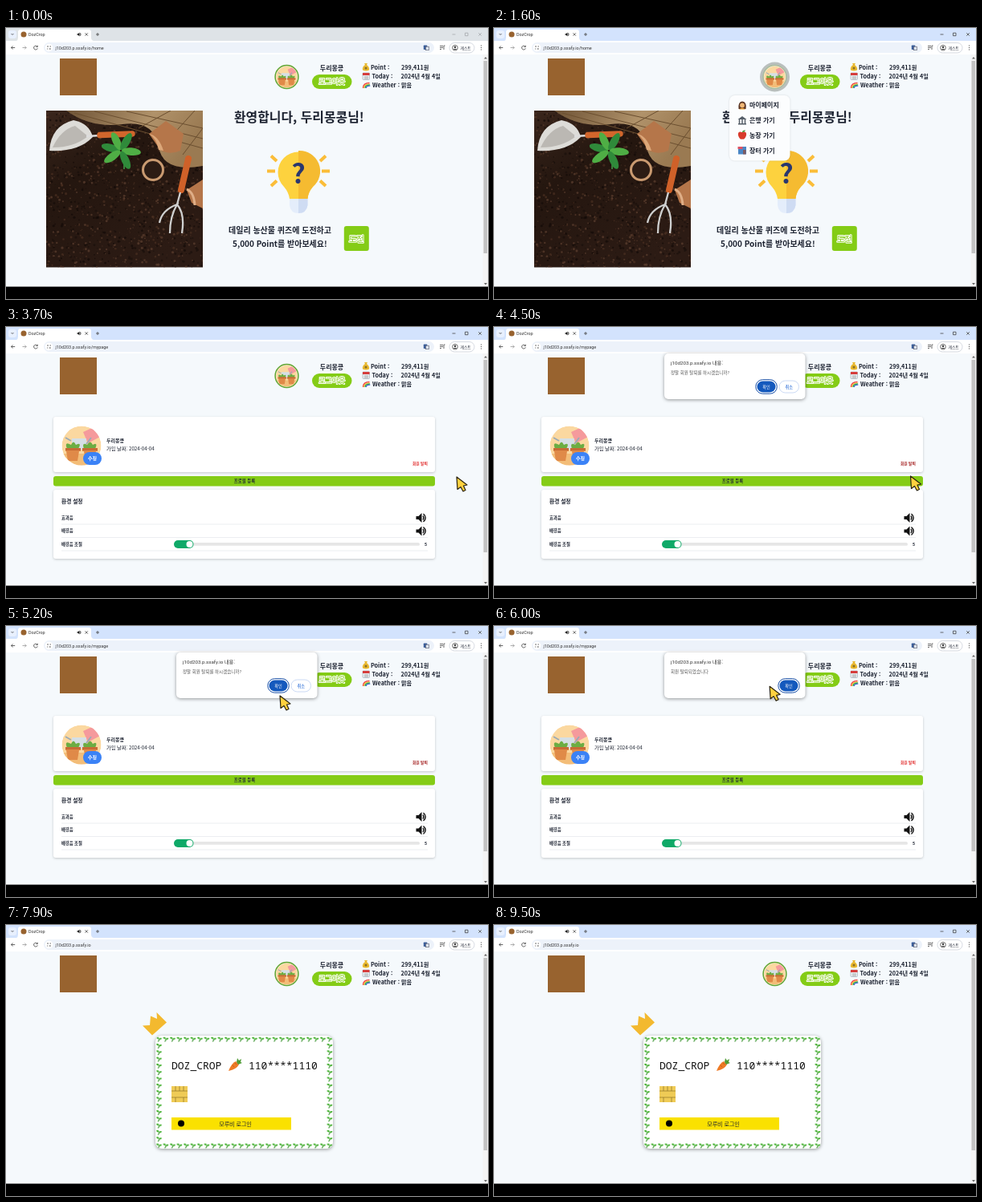
Write an HTML page that moves like this. It is 600 px wide and 338 px high and loops after 9600 ms.

```html
<!DOCTYPE html>
<html lang="ko">
<head>
<meta charset="utf-8">
<style>
html, body { margin: 0; width: 100%; height: 100%; overflow: hidden; background: #000; }
svg { display: block; width: 100vw; height: 100vh; }
text { font-family: "Noto Sans CJK KR", "Noto Sans CJK", "Noto Sans KR", sans-serif; fill: #1c2230; white-space: pre; }
.url { font-family: Roboto, sans-serif; fill: #333; }
.b { font-weight: 700; }
.mid { text-anchor: middle; }
.info { font-size: 7.2px; font-weight: 700; }
.row { font-size: 5.3px; font-weight: 700; }
.item { font-size: 8px; font-weight: 700; }
.line { fill: none; stroke: #444; stroke-width: .8; }
.puff { fill: #84cc16; stroke: #fff; stroke-width: 2; stroke-linejoin: round; paint-order: stroke; text-anchor: middle; }
.lime { fill: #84cc16; }
.card { fill: #fff; filter: drop-shadow(0 1px 1.5px #0003); }
.dialog { fill: #fff; filter: drop-shadow(0 1px 2px #0006); }
.ask { font-size: 5.5px; fill: #555; }
</style>
</head>
<body>
<svg viewBox="0 0 600 338" preserveAspectRatio="none">
<defs>
  <clipPath id="disc"><circle r="24.5"/></clipPath>
  <clipPath id="frame"><rect x="50" y="103" width="195" height="195.5"/></clipPath>
  <g id="avatar" clip-path="url(#disc)">
    <circle r="24.5" fill="#fbd8a0"/>
    <path d="M-25 10H25V25H-25Z" fill="#f3bd78"/>
    <path d="M2 -17l13 -6 8 12 -15 8z" fill="#f59a9c"/>
    <path d="M-12 -9h18v14h-18z" fill="#d5dfe5"/>
    <path d="M-13 -6l-7 -4M6 -2l6 -8" stroke="#9cabb5" stroke-width="2"/>
    <path d="M-18 4q-4 -10 5 -5q3 -7 6 0q8 -4 3 5zM3 4q-3 -9 4 -5q4 -7 7 0q7 -4 3 5z" fill="#6cad43"/>
    <path d="M-20 3H-1V7H-3L-5 19H-17L-19 7H-20ZM1 3H20V7H18L16 19H5L3 7H1Z" fill="#e08a48"/>
    <path d="M-20 3H-1V6H-20ZM1 3H20V6H1Z" fill="#c76b35"/>
  </g>
  <g id="speaker">
    <path d="M-6 -2h3l4 -4v12l-4 -4h-3z" fill="#111"/>
    <path d="M2.5 -2.5q2 2.5 0 5M3 -5q5.500 5 0 10" fill="none" stroke="#111" stroke-width="1.400"/>
  </g>
  <pattern id="sprouts" x="186" y="138" width="8.5" height="8.3" patternUnits="userSpaceOnUse">
    <path d="M1 2q3.500 -1.500 3.500 2q-3 1 -3.500 -2zM8 3q-3.500 -1 -3.500 2q3 .8 3.500 -2z" fill="#3fae2a"/>
    <path d="M4.500 4q.5 2 -1.500 3.500" fill="none" stroke="#2f8f24"/>
  </pattern>
  <linearGradient id="soil" x2=".6" y2="1"><stop stop-color="#3a261c"/><stop offset=".4" stop-color="#24160f"/><stop offset="1" stop-color="#2c1b14"/></linearGradient>
  <linearGradient id="burlap" x2="1" y2=".3"><stop stop-color="#6d5235"/><stop offset=".6" stop-color="#b0926a"/><stop offset="1" stop-color="#9a7a52"/></linearGradient>
</defs>

<!-- browser -->
<rect width="600" height="323" fill="#f5f9fc"/>
<rect id="strip" width="600" height="18"/>
<path d="M13 16Q15 15 15 12V5Q15 2 18 2H103Q106 2 106 5V12Q106 15 109 16H600V33H0V16Z" fill="#fff"/>
<rect x="3" y="3" width="10" height="10" rx="3" fill="#e8f0fe"/>
<path class="line" d="M6.500 7l1.500 1.500 1.500 -1.500M98.500 6.300l3.400 3.400m0 -3.400l-3.400 3.400M112 8h4m-2 -2v4"/>
<path id="controls" class="line" d="M555.500 8h4M571.500 6.200h3.500v3.500h-3.500zM588.300 6.200l3.500 3.500m0 -3.500l-3.500 3.500"/>
<circle cx="22" cy="8" r="3.500" fill="#98632f"/>
<text class="url" x="28" y="10.200" font-size="5.400">DozCrop</text>
<use href="#speaker" transform="translate(91 8) scale(.4)"/>
<path class="line" d="M11.200 24.500H6.500m2 -2l-2 2 2 2M39 23.300a2.400 2.400 0 1 0 .3 2M39.300 21.800v1.800h-1.800"/>
<path class="line" d="M20.500 24.500h4.700m-2 -2l2 2 -2 2" style="stroke:#999"/>
<rect x="47" y="18" width="486" height="13" rx="6.500" fill="#edf2fa"/>
<circle cx="53.500" cy="24.500" r="4.800" fill="#fff"/>
<path class="line" d="M51 23h2m1.500 0h1.500M51 26h1m1.500 0h2.500"/>
<text id="address" class="url" x="61.500" y="26.600" font-size="5.450"></text>
<rect x="519.800" y="21.500" width="4.500" height="5.500" rx=".8" fill="#3c5f9b"/><rect x="522.500" y="23.200" width="3.800" height="4.500" fill="#dce4f0" stroke="#556" stroke-width=".6"/>
<path class="line" d="M540 22.500h4M540 24.500h4M540 26.500h2M545 27v-5h1.500"/>
<rect x="552" y="18.500" width="31" height="12.500" rx="6.200" fill="#fff" stroke="#c5cbd5" stroke-width=".7"/>
<circle class="line" cx="559" cy="24.700" r="3.300"/><circle cx="559" cy="23.800" r="1.100"/><path d="M557 26.800q2 -2 4 0z"/>
<text x="565.500" y="26.600" font-size="4.800">게스트</text>
<path d="M591 21.500h1v1h-1zM591 24h1v1h-1zM591 26.500h1v1h-1z" fill="#444"/>
<rect x="593.500" y="33" width="6.500" height="290" fill="#f4f4f4"/>
<rect x="594.500" y="41" width="4.500" height="240" fill="#c2c2c2"/>
<path d="M595 38.500h4l-2 -2.500zM595 318h4l-2 2.500z" fill="#666"/>
<rect y="322.600" width="600" height="16"/>

<!-- page header -->
<rect x="67" y="38" width="46" height="46" fill="#98632f"/>
<g transform="translate(349.500 61)">
  <circle id="halo" r="18.500" fill="#b9bfbd"/>
  <circle r="14.500" fill="#fdf0d8"/>
  <use href="#avatar" transform="scale(.54)"/>
  <circle id="ring" r="14.400" fill="none" stroke-width="1.500"/>
</g>
<text class="b mid" x="405.500" y="53.300" font-size="8">두리몽콩</text>
<rect class="lime" x="381" y="58" width="49.500" height="18" rx="9"/>
<text class="puff" x="405.700" y="70.300" font-size="9">로그아웃</text>
<path d="M446 44h4l-1 2q4 3 3 6.500q-4 2 -8 0q-1 -4 3 -6.500z" fill="#e9b92f"/><circle cx="448" cy="50" r="1.600" fill="#8c7122"/>
<rect x="444" y="56" width="8.500" height="8.500" rx="1" fill="#e9edf1" stroke="#8795a3" stroke-width=".5"/><path d="M444 56h8.500v3h-8.500z" fill="#d63c3c"/><path d="M446 61h5M446 63h5" stroke="#777" stroke-width=".6"/>
<g fill="none" stroke-width="1.300"><path d="M444.500 75q0 -6.500 8 -6.500" stroke="#e44"/><path d="M445.700 75q0 -5 7 -5.200" stroke="#fb3"/><path d="M447 75q0 -4 6 -4" stroke="#3a5"/><path d="M448.300 75q0 -3 5 -2.800" stroke="#46c"/></g>
<g class="info">
  <text x="454" y="51.800">Point :</text><text x="492" y="51.800">299,411원</text>
  <text x="455.500" y="62.800">Today :</text><text x="491.500" y="62.800">2024년 4월 4일</text>
  <text x="456" y="73.800">Weather :</text><text x="492" y="73.800">맑음</text>
</g>

<g id="home">
  <g clip-path="url(#frame)">
    <rect x="50" y="103" width="195" height="196" fill="url(#soil)"/>
    <g id="crumbs"></g>
    <path d="M75 103Q105 125 145 120T190 148T245 172V103Z" fill="url(#burlap)"/>
    <path d="M85 106L245 150M110 104L245 138M150 104L245 125M165 125L205 103M195 147L235 103M220 158L245 125" stroke="#6b4f30" fill="none"/>
    <path d="M178 132l21 -16 22 16 -4 21q-14 6 -25 -1z" fill="#b5764a"/><path d="M178 132q12 2 18 21l-6 -1q-3 -15 -12 -20z" fill="#dca779"/>
    <path d="M225 202l20 -13v36l-14 -7z" fill="#b5764a"/><path d="M225 201q9 4 10 20" stroke="#dfae87" stroke-width="3" fill="none"/>
    <path d="M54 153Q56 122 84 115Q104 119 108 136Q90 155 54 153Z" fill="#dddcd8"/><path d="M58 149Q68 127 86 122L102 135Q85 149 58 149Z" fill="#bbb8b3"/>
    <path d="M100 135L118 134" stroke="#ddd" stroke-width="2.500"/><path d="M117 133.500L157 132" stroke="#d2662c" stroke-width="7.500" stroke-linecap="round"/>
    <path d="M143 154Q148 163 147 176" stroke="#3a7f3a" stroke-width="2" fill="none"/>
    <g id="leaves"></g>
    <circle cx="183" cy="177" r="12.500" fill="#2c1c14" stroke="#c99a70" stroke-width="3"/>
    <path d="M227 163L218 202" stroke="#cf6129" stroke-width="8" stroke-linecap="round"/>
    <path d="M217 205L213 220M191 243Q194 227 213 220Q204 235 204 256M213 220Q223 232 219 256" stroke="#cfd0d0" stroke-width="2.300" fill="none"/>
  </g>
  <text class="b" x="284" y="117.200" font-size="15.900">환영합니다, 두리몽콩님!</text>
  <path d="M325 178.500h10M393 178.500h10M330 159.500l7 6.500M398 159.500l-7 6.500M330 197l7 -6.500M398 197l-7 -6.500" stroke="#fbbd38" stroke-width="4"/>
  <path d="M353 213Q352 205 346 198A25.500 25.500 0 1 1 382 198Q376 205 375.500 213Z" fill="#fdd23e"/>
  <path d="M364 153A25.500 25.500 0 0 1 382 198Q376 205 375.500 213H364Z" fill="#f5bb31"/>
  <path d="M353 213H375.500V221Q374 231 364 231Q354 231 353 221Z" fill="#e4edfb"/><path d="M364 213H375.500V221Q374 231 364 231Z" fill="#cfdcf3"/>
  <text class="mid" x="364" y="194" font-size="34" font-weight="900" style="fill:#29376f">?</text>
  <text class="b" x="277" y="256.200" font-size="10">데일리 농산물 퀴즈에 도전하고</text>
  <text class="b" x="282" y="273.400" font-size="10">5,000 Point를 받아보세요!</text>
  <rect class="lime" x="420.800" y="247" width="31" height="31" rx="3"/>
  <text class="puff" x="436.300" y="266.500" font-size="10.500">도전</text>
</g>

<g id="menu">
  <rect x="293" y="84" width="75.500" height="81.500" rx="7" fill="#fcfdfe" style="filter:drop-shadow(0 .5px 1px #0002)"/>
  <path d="M304.500 101q-1 -9 4.500 -9.500q6 .5 4.500 9.500z" fill="#5b3525"/><circle cx="309" cy="96.500" r="2.900" fill="#f1b877"/><path d="M305 101.500q4 -3.500 8 0z" fill="#e69a2c"/>
  <path d="M303.500 114l5.500 -4 5.500 4zM304 119h10v1.500h-10z" fill="#555e68"/><path d="M305.500 114v5M309 114v5M312.500 114v5" stroke="#555e68" stroke-width="1.500"/>
  <path d="M309 130q6 -2 5 4q-2 6 -5 4.500q-3 1.500 -5 -4.500q-1 -6 5 -4z" fill="#d83b2c"/><path d="M309 130q0 -3 4 -2.500q-1 3 -4 2.500" fill="#4c9b3e"/>
  <path d="M304 148h10v9.500h-10z" fill="#4a86c5"/><path d="M303.500 148h6v3h-6z" fill="#dd5365"/><path d="M310 152h3.500v5.500h-3.500z" fill="#7d5a62"/>
  <g class="item"><text x="318" y="99.300">마이페이지</text><text x="318" y="118">은행 가기</text><text x="318" y="136.500">농장 가기</text><text x="318" y="155.500">장터 가기</text></g>
</g>

<g id="mypage">
  <rect class="card" x="59" y="112" width="475" height="69" rx="3"/>
  <use href="#avatar" x="94" y="148"/>
  <rect x="96" y="156" width="23" height="16" rx="8" fill="#3b82f6"/><text class="b mid" x="107.500" y="166" font-size="6" style="fill:#fff">수정</text>
  <text class="b" x="125" y="143.700" font-size="6">두리몽콩</text>
  <text x="125" y="154" font-size="6.200" font-weight="500">가입 날짜: 2024-04-04</text>
  <text id="leave" class="b" x="506" y="172.200" font-size="4.750">회원 탈퇴</text>
  <rect class="lime" x="59" y="186" width="475" height="12.500" rx="3"/>
  <text class="b mid" x="297" y="194.200" font-size="5.400">프로필 등록</text>
  <rect class="card" x="59" y="203" width="475" height="86" rx="3"/>
  <text class="b" x="69" y="219.800" font-size="6.700">환경 설정</text>
  <path d="M69 246H525M69 262.500H525M69 279H525" stroke="#e8eaee" stroke-width=".8"/>
  <g class="row"><text x="69" y="239.500">효과음</text><text x="69" y="256">배경음</text><text x="69" y="272.800">배경음 조절</text><text x="521" y="273">5</text></g>
  <use href="#speaker" x="516.500" y="238"/><use href="#speaker" x="516.500" y="254.500"/>
  <rect x="212" y="269" width="303" height="3.800" rx="1.900" fill="#e6e6e6"/>
  <rect x="209" y="266" width="24.500" height="10" rx="5" fill="#0fa968"/><circle cx="228.500" cy="271" r="4" fill="#fff"/>
</g>

<g id="dialog">
  <rect class="dialog" x="212" y="33" width="175.500" height="57" rx="5"/>
  <text class="url" x="220" y="47" font-size="6.200">j10d203.p.ssafy.io <tspan font-family="Noto Sans CJK KR, sans-serif">내용:</tspan></text>
  <text id="question" class="ask" x="220" y="58.700"></text>
  <g id="cancel"><rect x="355" y="67" width="24.500" height="15" rx="7.500" fill="#fff" stroke="#bdd0f2" stroke-width=".8"/><text class="mid" x="367.300" y="76.500" font-size="5.200" style="fill:#0b57d0">취소</text></g>
  <g id="confirm"><rect x="325.800" y="65.700" width="26.500" height="17.500" rx="8.700" fill="#fff" stroke="#174ea6"/><rect x="327.500" y="67.400" width="23" height="14" rx="7" fill="#1459bd"/><text class="mid" x="339" y="76.500" font-size="5.200" style="fill:#fff">확인</text></g>
</g>

<g id="login">
  <rect class="dialog" x="186" y="138" width="221" height="141" rx="8"/>
  <rect x="186" y="138" width="221" height="141" rx="8" fill="url(#sprouts)"/>
  <rect x="194.500" y="146.300" width="204" height="124.500" fill="#fff"/>
  <g font-size="13"><text x="206" y="179.500" style="font-family:'Noto Sans Mono',monospace;fill:#111">DOZ_CROP</text><text x="302" y="179.500" style="font-family:'Noto Sans Mono',monospace;fill:#111">110****1110</text></g>
  <path d="M277 182q4 -10 9 -12l4 4q-3 6 -13 8z" fill="#ee7b26"/><path d="M287 171l1 -5 2 3 3 -2 -1 4 2 1 -5 2z" fill="#4f9c35"/><path d="M282 175l2 2M285 172l2 2" stroke="#b9531a" stroke-width=".7"/>
  <rect x="206" y="201" width="20" height="20" fill="#efcb56"/>
  <path d="M206 207h20M206 215h20M211 201v6M216 201v6M221 201v6M211 215v6M221 215v6" stroke="#8f7428" stroke-width=".7"/>
  <rect x="206" y="240" width="149" height="15.500" fill="#fae100"/>
  <circle cx="218" cy="247.500" r="4"/><text class="mid" x="285.500" y="250.500" font-size="7">모루비 로그인</text>
  <path id="crown" d="M182 137.500L170 125.500L179 125L180 113.500L188 117L187.500 109L200 121.500Z" fill="#f3b92f"/>
</g>

<path id="cursor" d="M0 0L1 15.500L5 12.500L8 18L11 16.500L8.500 11L13 10Z" fill="#ffd23f" stroke="#2b2410" stroke-width="1.200" stroke-linejoin="round"/>
</svg>

<script>
const el = Object.fromEntries([...document.querySelectorAll('[id]')].map(e => [e.id, e]));
const show = (e, on) => e.setAttribute('display', on ? 'inline' : 'none');

let seed = 7;
const random = () => (seed = seed * 16807 % 2147483647) / 2147483647;
const soilTones = ['#130b08', '#4a2f22', '#5d3f30', '#1a100c'];
el.crumbs.innerHTML = Array.from({ length: 1500 }, (_, i) =>
  `<circle cx="${50 + random() * 195}" cy="${103 + random() * 196}" r="${.4 + random() * 1.2}" fill="${soilTones[i % 4]}" opacity=".7"/>`).join('');
el.leaves.innerHTML = [-165, -115, -60, 5, 65, 145].map((a, i) =>
  `<ellipse cx="13" rx="12" ry="4.800" fill="${i % 2 ? '#4fae45' : '#2f8a3a'}" transform="translate(143 153) rotate(${a})"/>`).join('');

// time, x, y of the pointer tip
const path = [
  [2400, 581, 255], [3000, 561, 187], [3700, 561, 187], [4200, 515, 171], [4400, 515, 171],
  [4600, 522, 201], [5200, 341, 87], [5500, 340, 75], [5800, 340, 75], [6600, 360, 77], [7300, 360, 77]
];

function pointer(t) {
  const i = path.findIndex(p => p[0] > t);
  const [t0, x0, y0] = path[i - 1], [t1, x1, y1] = path[i];
  const u = (t - t0) / (t1 - t0), k = u * u * (3 - 2 * u);
  return [x0 + (x1 - x0) * k, y0 + (y1 - y0) * k];
}

function draw(now) {
  const t = Math.floor(now % 9600 / 100) * 100;
  const within = (a, b) => t >= a && t < b;
  const focused = t >= 100, hover = within(1400, 2100);
  const asking = within(4300, 5800), done = within(6000, 7200);

  el.strip.style.fill = focused ? '#d3e3fd' : '#dee3e7';
  el.controls.style.stroke = focused ? '#444' : '#a5a9ad';

  show(el.home, t < 2100);
  show(el.menu, hover);
  show(el.mypage, within(2100, 7300));
  show(el.login, t >= 7300);
  el.address.textContent = 'j10d203.p.ssafy.io' + (t < 2100 ? '/home' : t < 7300 ? '/mypage' : '');
  show(el.halo, hover);
  el.ring.setAttribute('stroke', hover ? '#a9bd9c' : '#61a533');
  el.leave.style.fill = within(4100, 6000) ? '#a01818' : '#e02424';

  show(el.dialog, asking || done);
  show(el.cancel, asking);
  el.question.textContent = asking ? '정말 회원 탈퇴를 하시겠습니까?' : '회원 탈퇴되었습니다';
  el.confirm.setAttribute('transform', `translate(${asking ? 0 : 28} 0)`);

  const pointing = within(2400, 7300);
  show(el.cursor, pointing);
  if (pointing) el.cursor.setAttribute('transform', `translate(${pointer(t)})`);
  el.crown.setAttribute('transform', `rotate(${1.5 * Math.sin((t - 7900) / 800 * 2 * Math.PI)} 185 124)`);
  requestAnimationFrame(() => draw(performance.now()));
}
draw(performance.now());
</script>
</body>
</html>
```
